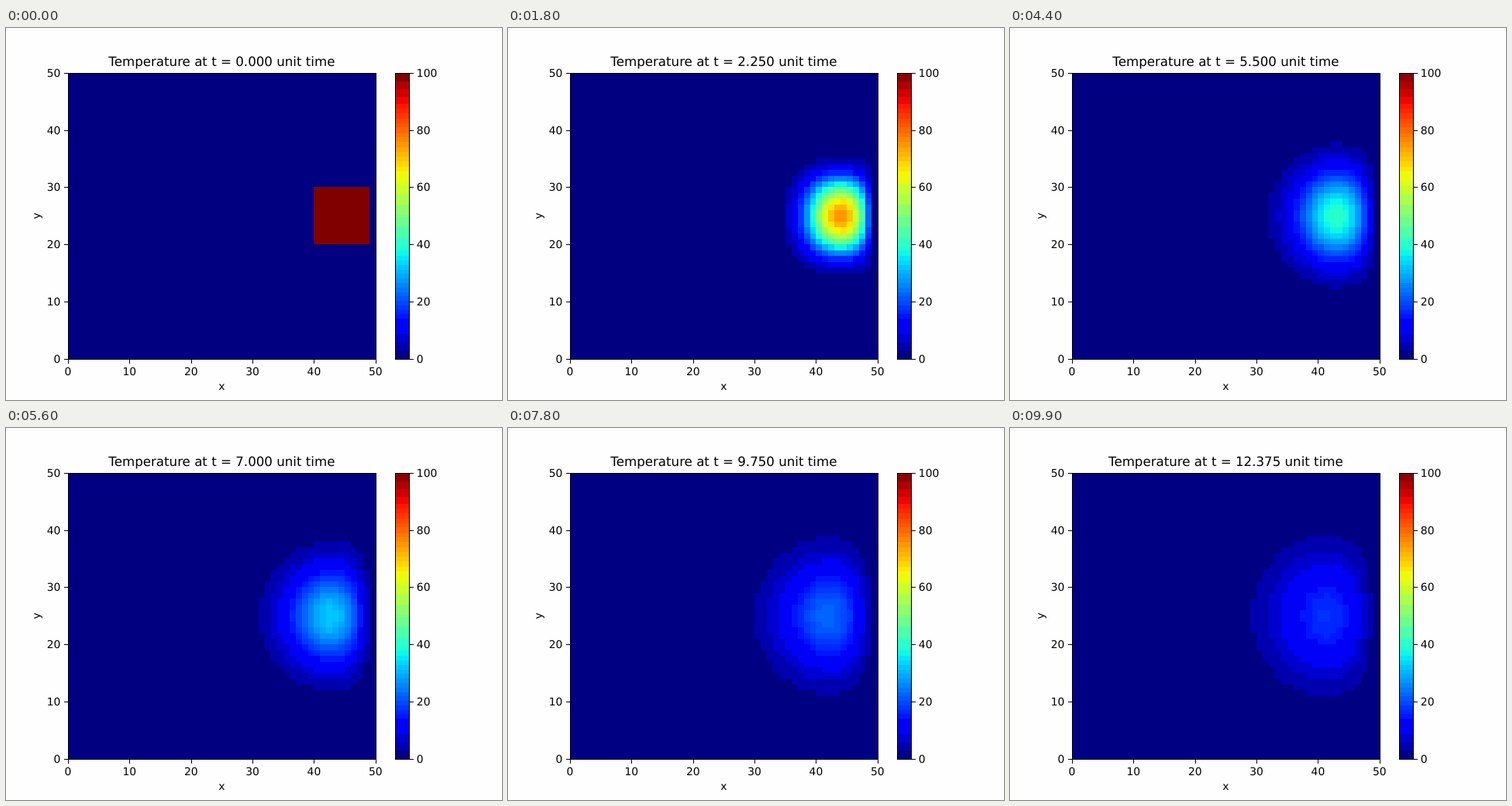
An HTML page with a canvas for the animation above (10000 ms loop, 640 by 480 pixels).

```html
<!DOCTYPE html>
<html lang="en">
<head>
<meta charset="utf-8">
<title>Heat diffusion on a plate</title>
<style>
  html, body { margin: 0; width: 100%; height: 100%; overflow: hidden; background: #fefefe; }
  canvas { display: block; }
</style>
</head>
<body>
<canvas id="stage" width="640" height="480"></canvas>
<script>
const ctx = document.getElementById('stage').getContext('2d');
const SIZE = 50, STEPS = 100, STEP_MS = 100, DT = 0.125;
const LEFT = 80, BOTTOM = 427.2, WIDTH = 396.8, HEIGHT = 369.6;

// Each step replaces an inner cell by the mean of its four neighbours; the rim stays at 0.
function diffuse(u) {
  const next = new Float64Array(SIZE * SIZE);
  for (let y = 1; y < SIZE - 1; y++)
    for (let x = 1; x < SIZE - 1; x++) {
      const i = y * SIZE + x;
      next[i] = (u[i - 1] + u[i + 1] + u[i - SIZE] + u[i + SIZE]) / 4;
    }
  return next;
}

const states = [new Float64Array(SIZE * SIZE)];
for (let y = 20; y < 30; y++) states[0].fill(100, y * SIZE + 40, y * SIZE + 49);
while (states.length < STEPS) states.push(diffuse(states[states.length - 1]));

// Piecewise linear channel through [position, level] points.
function channel(points, v) {
  const i = Math.max(1, points.findIndex(p => p[0] >= v));
  const [x0, y0] = points[i - 1], [x1, y1] = points[i];
  return Math.round(255 * (y0 + (y1 - y0) * (v - x0) / (x1 - x0)));
}

const RED = [[0, 0], [.35, 0], [.66, 1], [.89, 1], [1, .5]];
const GREEN = [[0, 0], [.125, 0], [.375, 1], [.64, 1], [.91, 0], [1, 0]];
const BLUE = [[0, .5], [.11, 1], [.34, 1], [.65, 0], [1, 0]];
const jet = Array.from({ length: 256 }, (_, i) =>
  [RED, GREEN, BLUE].map(points => channel(points, i / 255)));
const band = jet.map(([r, g, b]) => (r >> 5) << 8 | (g >> 4) << 4 | b >> 5);

const edgeX = i => Math.round(LEFT + WIDTH * i / SIZE);
const edgeY = (i, n) => Math.round(BOTTOM - HEIGHT * i / n);

function block(x0, x1, row, rows, level) {
  const y = edgeY(row + 1, rows);
  return { x: x0, y, w: x1 - x0, h: edgeY(row, rows) - y, level };
}

const bar = jet.map((_, i) => block(502, 520, i, 256, i));

// Levels in the same band share their area-weighted mean colour.
function drawBlocks(blocks) {
  const sums = {};
  for (const { w, h, level } of blocks) {
    const s = sums[band[level]] ||= [0, 0, 0, 0];
    jet[level].forEach((c, k) => s[k] += c * w * h);
    s[3] += w * h;
  }
  for (const { x, y, w, h, level } of blocks) {
    const [r, g, b, area] = sums[band[level]];
    ctx.fillStyle = `rgb(${[r, g, b].map(c => Math.floor(c / area))})`;
    ctx.fillRect(x, y, w, h);
  }
}

function text(str, x, y, align = 'center', size = 13.889) {
  ctx.font = `${size}px "DejaVu Sans", sans-serif`;
  ctx.textAlign = align;
  ctx.fillText(str, x, y);
}

function drawAxes() {
  ctx.fillStyle = ctx.strokeStyle = '#000';
  ctx.lineWidth = 1;
  ctx.strokeRect(80.5, 58.5, 397, 369);
  ctx.strokeRect(502.5, 58.5, 18, 369);
  for (let i = 0; i <= 5; i++) {
    const x = edgeX(i * 10), y = edgeY(i, 5);
    ctx.fillRect(x, 428, 1, 5);
    ctx.fillRect(75, y, 5, 1);
    ctx.fillRect(521, y, 5, 1);
    text(i * 10, LEFT + WIDTH * i / 5, 448);
    text(i * 10, 70.3, y + 5, 'right');
    text(i * 20, 529.8, y + 5, 'left');
  }
  text('x', 278.4, 467);
  ctx.save();
  ctx.translate(44, 242.4);
  ctx.rotate(-Math.PI / 2);
  text('y', 0, 0);
  ctx.restore();
}

function draw(step) {
  ctx.fillStyle = '#fefefe';
  ctx.fillRect(0, 0, 640, 480);
  const cells = Array.from(states[step], (v, i) => {
    const x = i % SIZE, y = Math.floor(i / SIZE);
    return block(edgeX(x), edgeX(x + 1), y, SIZE, Math.min(255, Math.floor(v * 2.56)));
  });
  drawBlocks([...cells, ...bar]);
  drawAxes();
  text(`Temperature at t = ${(step * DT).toFixed(3)} unit time`, 278.4, 49, 'center', 16.667);
}

ctx.textRendering = 'geometricPrecision';
let shown = -1;
function tick() {
  const step = Math.floor(performance.now() / STEP_MS) % STEPS;
  if (step !== shown) draw(shown = step);
  requestAnimationFrame(tick);
}
tick();
</script>
</body>
</html>
```
